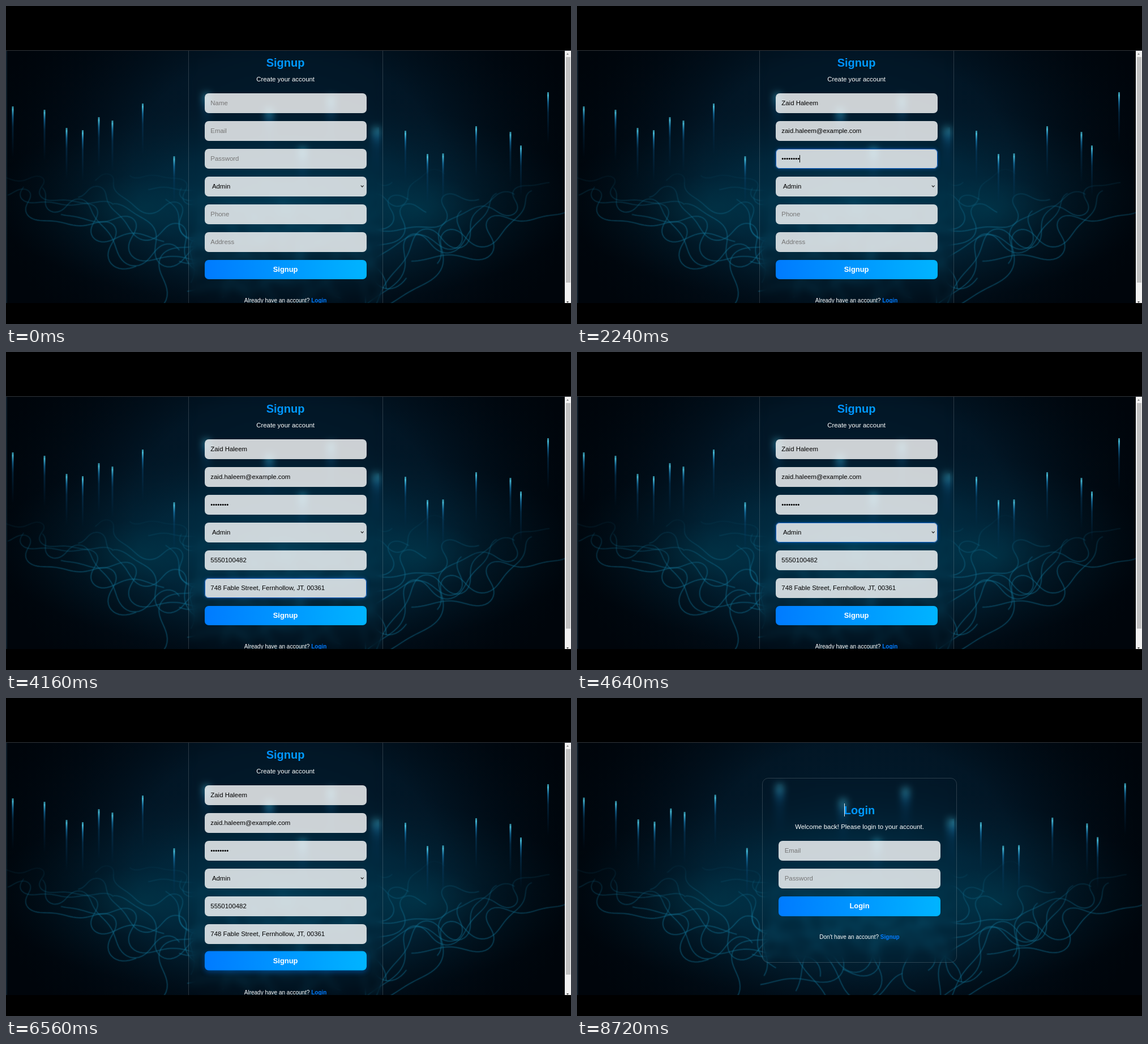
Animation of 998 by 561 pixels, one loop 8800 ms. Source, as an HTML page with a canvas:

```html
<!DOCTYPE html>
<html lang="en">
<head>
<meta charset="utf-8">
<title>Signup</title>
<style>
  html, body { margin: 0; width: 100%; height: 100%; overflow: hidden; background: #000; }
  body { position: relative; font: 11.43px/34.6px "Liberation Sans", Arial, sans-serif; color: #fff; }
  div, canvas { position: absolute; box-sizing: border-box; white-space: pre; }
  .page { left: 0; top: 78px; width: 998px; height: 446px; overflow: hidden; }
  .page canvas { left: 0; top: 0; }
  .edge { left: 0; top: 78px; width: 998px; height: 1px; background: #30343a; }
  .panel { border: 1px solid rgba(255, 255, 255, .17); backdrop-filter: blur(7px); }
  #signup .panel { left: 321.6px; top: -40px; width: 344.4px; height: 540px; }
  #login .panel { left: 327px; top: 63px; width: 344.4px; height: 326px; border-radius: 10.7px; }
  .form { top: -78px; width: 286px; height: 561px; }
  #signup .form { left: 350.6px; }
  #login .form { left: 356px; }
  .form > div { left: 0; width: 286px; height: 34.6px; }
  .line, .button { text-align: center; }
  .title { font-size: 20px; font-weight: bold; color: transparent;
    background: linear-gradient(90deg, #007bff, #00b4ff); background-clip: text; -webkit-background-clip: text; }
  .foot { font-size: 10px; }
  .foot b { color: #007bff; }
  .field { padding-left: 10.7px; border-radius: 7.1px; background: rgba(255, 255, 255, .8); color: #757575; }
  .field.on { color: #000; }
  .select { padding-left: 13.3px; color: #000; }
  .select::after { content: ""; position: absolute; right: 5.5px; top: 14px; width: 4.4px; height: 4.4px;
    box-sizing: border-box; border: solid #111; border-width: 0 1.2px 1.2px 0; transform: rotate(45deg); }
  .glow { inset: 0; border: 1px solid #1261c4; border-radius: 7.1px; opacity: 0;
    box-shadow: 0 0 6px rgba(0, 123, 255, .38); }
  .caret { display: inline-block; width: 1px; height: 13px; background: #000; vertical-align: -2.5px; }
  .button { border-radius: 7.1px; font-size: 12.86px; font-weight: bold;
    background: linear-gradient(90deg, #007bff, #00b4ff); }
  #mark { left: 472px; top: 108px; width: 1px; height: 23px; background: #e4edf2; }
  .bar { left: 987px; top: 0; width: 11px; height: 446px; background: #f1f1f1; }
  .thumb { left: 1.5px; top: 11.5px; width: 8.5px; height: 398px; background: #c1c1c1; }
  .arrow { left: 3px; border: solid transparent; border-width: 0 2.5px; }
  .up { top: 5px; border-bottom: 3px solid #8a8a8a; }
  .down { top: 443px; border-top: 3px solid #505050; }
</style>
</head>
<body>
<div class="page" id="signup">
  <canvas width="987" height="446"></canvas>
  <div class="panel"></div>
  <div class="form"></div>
  <div class="bar"><div class="thumb"></div><div class="arrow up"></div><div class="arrow down"></div></div>
</div>
<div class="page" id="login">
  <canvas width="998" height="446"></canvas>
  <div class="panel"></div>
  <div class="form"></div>
  <div id="mark"></div>
</div>
<div class="edge"></div>
<script>
const LOOP = 8800, STEP = 80, BLINK = 320, FADE = 200;
const FIRST = 560, HOVER = 5600, SWITCH = 6800, MARK = 7280;
const ROW = 171.5, PITCH = 48.95;

// label, value, place in the focus order
const fields = [
  ["Name", "Zaid Haleem", 0],
  ["Email", "zaid.haleem@example.com", 1],
  ["Password", "••••••••", 2],
  ["Admin", "", 5],
  ["Phone", "5550100482", 3],
  ["Address", "748 Fable Street, Fernhollow, JT, 00361", 4]
];
const focusAt = n => n > 5 ? HOVER : Math.max(FIRST, 400 + 800 * n);

// x, top of each light; those behind the panel are nearer and wider
const lights = [[12, 177], [68, 183], [107, 215], [135.5, 219], [164, 196], [188, 202], [241.5, 172], [297, 265],
  [705.5, 220], [744.5, 261], [772, 260], [830.5, 212], [891, 222], [909.5, 246], [957.5, 152]];
const near = [[354, 154], [465, 180], [574, 160], [654, 214], [524, 250]];

function seeded(seed) {
  return () => (seed = seed * 16807 % 2147483647) / 2147483647;
}

function oval(c, x, y, rx, ry, stops) {
  c.save();
  c.translate(x, y);
  c.scale(rx, ry);
  const g = c.createRadialGradient(0, 0, 0, 0, 0, 1);
  stops.forEach((color, i) => g.addColorStop(i / (stops.length - 1), color));
  c.fillStyle = g;
  c.fillRect(-1, -1, 2, 2);
  c.restore();
}

function beam(c, x, y, w) {
  const g = c.createLinearGradient(0, y, 0, y + 90);
  g.addColorStop(0, "rgba(70,200,225,.6)");
  g.addColorStop(.06, "rgba(80,210,240,.85)");
  g.addColorStop(.2, "rgba(25,130,190,.65)");
  g.addColorStop(.4, "rgba(8,75,120,.4)");
  g.addColorStop(1, "rgba(0,50,90,0)");
  c.fillStyle = g;
  c.fillRect(x - w / 2, y, w, 90);
}

// Lines that wander over a receding floor and fade at the horizon
function floorLines(c) {
  const rand = seeded(71);
  const ink = alpha => {
    const g = c.createLinearGradient(0, 280, 0, 390);
    g.addColorStop(0, "rgba(16,115,150,0)");
    g.addColorStop(1, `rgba(16,115,150,${alpha})`);
    return g;
  };
  const core = ink(.42), halo = ink(.1);
  c.lineCap = c.lineJoin = "round";
  for (let i = 0; i < 34; i++) {
    let x = i * 31 - 30, y = 292 + 75 * rand();
    const side = x < 494 ? 1 : -1, p = rand() * 6, q = rand() * 6;
    c.beginPath();
    for (let s = 0; s < 90 && y < 535; s++) {
      const depth = (y - 262) / 260;
      const a = .55 + .9 * Math.sin(s / 8 + p) + .6 * Math.sin(s / 4.3 + q);
      x += side * Math.cos(a) * (2 + 5 * depth);
      y += Math.sin(a) * (1 + 6 * depth);
      c.lineTo(x, y);
    }
    [[halo, 4], [core, 1.3]].forEach(([style, width]) => {
      c.strokeStyle = style;
      c.lineWidth = width;
      c.stroke();
    });
  }
}

function paint(canvas, scale) {
  const c = canvas.getContext("2d");
  c.fillStyle = "#00050b";
  c.fillRect(0, 0, 998, 446);
  c.translate(0, 301 - 78);
  c.scale(scale, scale);
  c.translate(0, -301);
  oval(c, 494, 280, 540, 400, ["#021e32", "rgba(2,25,42,.85)", "rgba(0,10,20,0)"]);
  oval(c, 494, 345, 520, 185, ["rgba(0,66,92,.72)", "rgba(0,54,78,.46)", "rgba(0,30,45,0)"]);
  for (const x of [235, 725])
    oval(c, x, 358, 120, 60, ["rgba(0,95,115,.2)", "rgba(0,90,110,0)"]);

  floorLines(c);
  lights.forEach(([x, y]) => beam(c, x, y, 3));
  near.forEach(([x, y]) => beam(c, x, y, 9));

  c.setTransform(1, 0, 0, 1, 0, 0);
  c.fillStyle = "rgba(40,75,95,.35)";
  c.fillRect(0, 0, 2, 446);
}

function add(parent, cls, html, middle) {
  const el = document.createElement("div");
  el.className = cls;
  el.innerHTML = html;
  el.style.top = middle - 17.3 + "px";
  parent.append(el);
  return el;
}
const row = n => ROW + PITCH * n;

const [signup, login, mark] = ["signup", "login", "mark"].map(id => document.getElementById(id));
const [form, entry] = [signup, login].map(p => p.querySelector(".form"));
paint(signup.querySelector("canvas"), 1);
paint(login.querySelector("canvas"), 998 / 987);

add(form, "line title", "Signup", 100.3);
add(form, "line", "Create your account", 129.5);
const inputs = fields.map(([label, value], i) => {
  const el = add(form, value ? "field" : "field select",
    '<span></span><i class="caret"></i><div class="glow"></div>', row(i));
  const [text, caret, glow] = el.children;
  return { el, text, caret, glow };
});
const button = add(form, "button", "Signup", row(6));
add(form, "line foot", "Already have an account? <b>Login</b>", 520);

add(entry, "line title", "Login", 197.8);
add(entry, "line", "Welcome back! Please login to your account.", 227.3);
add(entry, "field", "Email", row(2));
add(entry, "field", "Password", row(3));
add(entry, "button", "Login", row(4));
add(entry, "line foot", "Don't have an account? <b>Signup</b>", 422);

const ramp = (t, start) => {
  const u = Math.min(1, Math.max(0, (t - start) / FADE));
  return u * u * (3 - 2 * u);
};
const lit = (t, start) => t >= start && Math.floor((t - start) / BLINK) % 2 === 0;

function render(t) {
  signup.style.visibility = t < SWITCH ? "visible" : "hidden";
  login.style.visibility = t < SWITCH ? "hidden" : "visible";
  fields.forEach(([label, value, order], i) => {
    const { el, text, caret, glow } = inputs[i];
    const start = focusAt(order), end = focusAt(order + 1), filled = value !== "" && t >= start;
    el.classList.toggle("on", filled);
    text.textContent = filled ? value : label;
    caret.style.opacity = filled && t < end && lit(t, start) ? 1 : 0;
    glow.style.opacity = ramp(t, start) - ramp(t, end);
  });
  const lift = ramp(t, HOVER);
  button.style.transform = `translateY(${-1.43 * lift}px)`;
  button.style.boxShadow = `0 3px 10px rgba(0,123,255,${.4 * lift})`;
  mark.style.opacity = lit(t, MARK) ? 1 : 0;
}

const begin = performance.now();
function tick() {
  const t = (performance.now() - begin) % LOOP;
  render(Math.floor(t / STEP) * STEP);
  requestAnimationFrame(tick);
}
tick();
</script>
</body>
</html>
```
